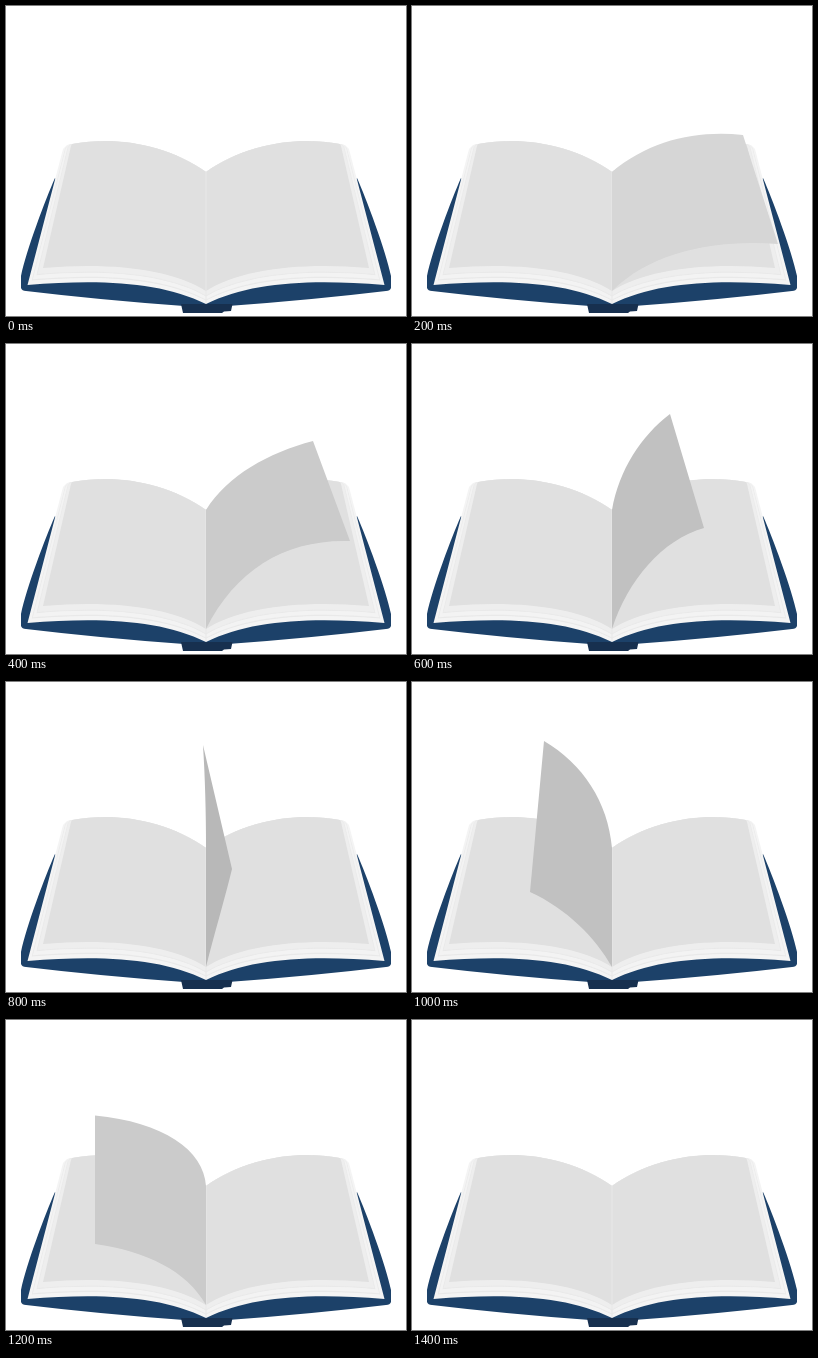
Animation of 400x310 px, one loop 1600 ms. Source, as an HTML page with a canvas:

```html
<!DOCTYPE html>
<html lang="en">
<head>
<meta charset="utf-8">
<title>Turning page</title>
<style>
html, body { margin: 0; width: 100%; height: 100%; overflow: hidden; background: #fff; }
canvas { display: block; width: 400px; height: 310px; }
</style>
</head>
<body>
<canvas id="stage" width="400" height="310"></canvas>
<script>
const ctx = document.getElementById('stage').getContext('2d');
const STEP = 200;
const LOOP = 1600;

// Each pose: top corner, bottom corner, controls of the top edge
// (from the spine), controls of the bottom edge (from the corner), shade.
const POSES = [
  null,
  { top: [331, 129], low: [366, 238], a: [238, 134, 285, 124], b: [305, 233, 240, 245], fill: '#d6d6d6' },
  { top: [307, 97], low: [344, 197], a: [222, 131, 262, 109], b: [280, 195, 230, 225], fill: '#cbcbcb' },
  { top: [258, 70], low: [292, 184], a: [207, 126, 229, 92], b: [250, 196, 216, 236], fill: '#c1c1c1' },
  { top: [197, 63], low: [226, 187], a: [200, 130, 199, 95], b: [219, 216, 208, 253], fill: '#b8b8b8' },
  { top: [132, 59], low: [118, 210], a: [196, 120, 171, 82], b: [155, 227, 183, 255], fill: '#c1c1c1' },
  { top: [89, 95.5], low: [89, 224], a: [198, 130, 157, 102], b: [140, 231, 181, 251], fill: '#cbcbcb' },
  null
];

const mix = (a, b, k) => a + (b - a) * k;

function shape(path, color) {
  ctx.fillStyle = color;
  ctx.fill(new Path2D(path));
}

function mirrored(paint) {
  paint();
  ctx.save();
  ctx.translate(400, 0);
  ctx.scale(-1, 1);
  paint();
  ctx.restore();
}

// One sheet of the left stack; k = 0 is the outermost, 1 the top one.
function sheet(k, color) {
  const at = (a, b) => mix(a, b, k).toFixed(2);
  shape(`M200 166 C160 138 110 130 ${at(61, 66)} ${at(139, 138)}
    L${at(57, 65)} ${at(143, 140)} L${at(21.5, 37)} ${at(279, 262)}
    C${at(95, 105)} ${at(273, 256)} ${at(155, 166)} ${at(276, 263)} 200 ${at(298, 285)} Z`, color);
}

function cover() {
  shape('M49 172 C40 192 20 245 15 270 L15 282 Q16 285 20 285 Q95 294 178 300 L200 300 V200 H70 Z', '#1c4169');
}

function stack() {
  sheet(0, '#f4f4f4');
  sheet(0.27, '#e9e9e9');
  sheet(0.34, '#f3f3f3');
  sheet(0.58, '#e9e9e9');
  sheet(0.65, '#eeeeee');
  sheet(1, '#e0e0e0');
}

function book() {
  mirrored(cover);
  shape('M175 298 H226.5 L225 305 L218 305.5 L216 307 H177 Z', '#17304f');
  mirrored(stack);
  shape('M199.5 166 H200.5 V297 H199.5 Z', '#e8e8e8');
}

function leaf({ top, low, a, b, fill }) {
  shape(`M200 166 C${a} ${top} L${low} C${b} 200 285 Z`, fill);
}

function draw(now) {
  const pose = POSES[Math.floor((now % LOOP) / STEP)];
  ctx.fillStyle = '#fff';
  ctx.fillRect(0, 0, 400, 310);
  book();
  if (pose) leaf(pose);
}

let start = null;
function tick(now) {
  if (start === null) start = now;
  draw(Math.max(0, now - start));
  requestAnimationFrame(tick);
}

draw(0);
requestAnimationFrame(tick);
</script>
</body>
</html>
```
